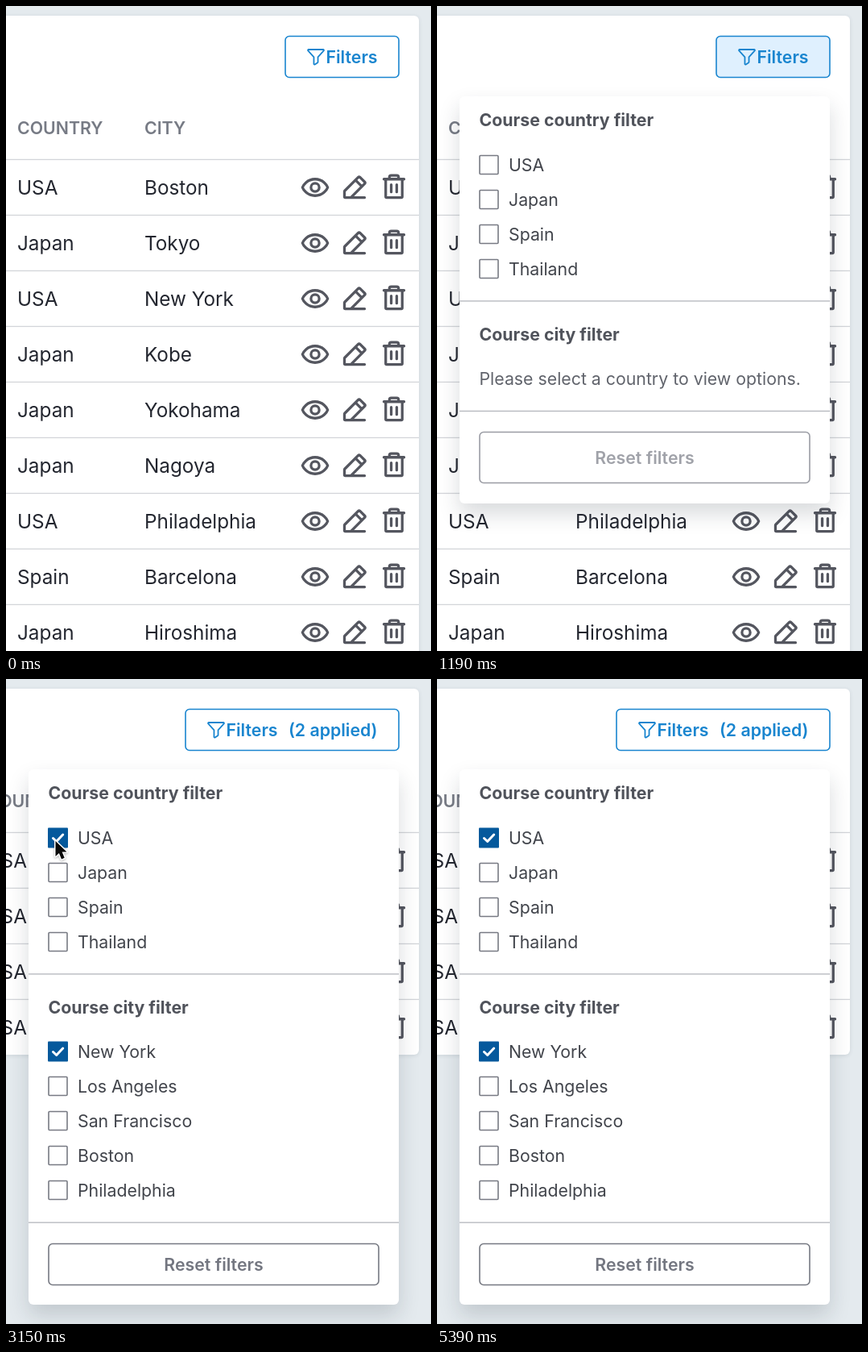
An HTML page with a canvas for the animation above (5.46 s loop, 528 px wide and 800 px high).

```html
<!DOCTYPE html>
<html lang="en">
<head>
<meta charset="utf-8">
<title>Table filters</title>
<style>
html, body { margin: 0; width: 100%; height: 100%; overflow: hidden; background: #e4eaee; }
canvas { display: block; width: 528px; height: 800px; }
</style>
</head>
<body>
<canvas id="stage"></canvas>
<script>
const W = 528, H = 800, LOOP = 5460;
const canvas = document.getElementById('stage');
const dpr = window.devicePixelRatio || 1;
canvas.width = W * dpr;
canvas.height = H * dpr;
const ctx = canvas.getContext('2d');

const BLUE = '#1985cf', ICON = '#54565f';
const ROWS = [
  ['USA', 'Boston'], ['Japan', 'Tokyo'], ['USA', 'New York'],
  ['Japan', 'Kobe'], ['Japan', 'Yokohama'], ['Japan', 'Nagoya'],
  ['USA', 'Philadelphia'], ['Spain', 'Barcelona'], ['Japan', 'Hiroshima']
];
const NY_ROWS = Array(4).fill(['USA', 'New York']);
const US_ROWS = Array(9).fill(['USA', 'Boston']);
const COUNTRIES = ['USA', 'Japan', 'Spain', 'Thailand'];
const CITIES = ['New York', 'Los Angeles', 'San Francisco', 'Boston', 'Philadelphia'];

// Icons on a 256-unit grid
const EYE = new Path2D('M128 56C58 56 24 110 18 128C24 146 58 200 128 200S232 146 238 128C232 110 198 56 128 56Z M164 128a36 36 0 1 1-72 0a36 36 0 1 1 72 0Z');
const PENCIL = new Path2D('M96 216H48a8 8 0 0 1-8-8v-44.7a8 8 0 0 1 2.3-5.6l120-120a8 8 0 0 1 11.4 0l44.6 44.6a8 8 0 0 1 0 11.4ZM216 216H96M136 64l56 56');
const TRASH = new Path2D('M216 56H40M104 104v64M152 104v64M200 56v152a8 8 0 0 1-8 8H64a8 8 0 0 1-8-8V56M168 56V40a16 16 0 0 0-16-16h-48a16 16 0 0 0-16 16v16');
const FUNNEL = new Path2D('M42 48h172a8 8 0 0 1 6 13.4L152 136v58a8 8 0 0 1-3.6 6.7l-32 21.3a8 8 0 0 1-12.4-6.6V136L36 61.4A8 8 0 0 1 42 48Z');
const ARROW = new Path2D('M0 0V19L4.4 15L7.5 22.4L11.2 20.8L8.1 13.6H14Z');
const HAND = new Path2D('M-2 2C-2-1 2-1 2 2V8C3 6 6 6 6 9C7 7 10 8 10 10C11 9 13 10 13 12V16C13 19 11 20 11 23H0C-1 20-5 17-7 13C-8 10-5 10-4 12L-2 14Z');

function text(str, x, cy, size, weight, color, align = 'left') {
  ctx.font = `${weight} ${size}px Inter, sans-serif`;
  ctx.fillStyle = color;
  ctx.textAlign = align;
  ctx.fillText(str, x, cy + size * 0.364);
}

function box(x, y, w, h, r, fill, stroke) {
  ctx.beginPath();
  ctx.roundRect(x, y, w, h, r);
  if (fill) { ctx.fillStyle = fill; ctx.fill(); }
  if (stroke) { ctx.strokeStyle = stroke; ctx.lineWidth = 1.6; ctx.stroke(); }
}

function raised(color, blur, dy, draw) {
  ctx.save();
  ctx.shadowColor = color;
  ctx.shadowBlur = blur * dpr;
  ctx.shadowOffsetY = dy * dpr;
  draw();
  ctx.restore();
}

function rule(x, y, w, color) {
  ctx.fillStyle = color;
  ctx.fillRect(x, y, w, 1.3);
}

function icon(path, x, y, scale, color, weight) {
  ctx.save();
  ctx.translate(x, y);
  ctx.scale(scale, scale);
  ctx.translate(-128, -128);
  ctx.strokeStyle = color;
  ctx.lineWidth = weight;
  ctx.lineCap = ctx.lineJoin = 'round';
  ctx.stroke(path);
  ctx.restore();
}

function table(rows, dx) {
  const bottom = 190 + rows.length * 69;
  raised('rgba(40,55,70,.12)', 5, 1, () =>
    box(-20, 12, 533, Math.min(bottom, 830) - 12, 6, '#fff'));
  text('COUNTRY', 14 + dx, 151, 21.3, 600, '#777b85');
  text('CITY', 172 + dx, 151, 21.3, 600, '#777b85');
  rows.forEach(([country, city], i) => {
    const y = 225 + i * 69;
    rule(0, y - 35.2, 513, '#d3d5d9');
    text(country, 14 + dx, y, 24.3, 400, '#23262f');
    text(city, 172 + dx, y, 24.3, 400, '#23262f');
    icon(EYE, 384, y, 0.1425, ICON, 23);
    icon(PENCIL, 433, y, 0.1425, ICON, 23);
    icon(TRASH, 482, y, 0.1425, ICON, 23);
  });
}

function filterButton(count, lit) {
  const x = count ? 223 : 347;
  box(x, 37.5, 488 - x, 51, 5, lit ? '#dff0fe' : '#fff', BLUE);
  icon(FUNNEL, x + 38, 62.5, 0.106, BLUE, 17);
  text('Filters', x + 50.5, 63, 21.3, 600, BLUE);
  if (count) text(`(${count} applied)`, 461.5, 63, 21.3, 600, BLUE, 'right');
}

function option(label, y, checked) {
  if (checked) {
    box(52, y - 12.5, 25, 25, 1, '#05599c');
    ctx.beginPath();
    ctx.moveTo(58.5, y + 0.5);
    ctx.lineTo(62.7, y + 4.5);
    ctx.lineTo(70.7, y - 4);
    ctx.strokeStyle = '#fff';
    ctx.lineWidth = 3;
    ctx.lineCap = ctx.lineJoin = 'round';
    ctx.stroke();
  } else {
    box(53, y - 11.5, 23, 23, 1, '#fff', '#777a83');
  }
  text(label, 89, y, 21.3, 400, '#41444b');
}

function panel(country, city) {
  const bottom = country ? 776 : 617;
  raised('rgba(30,40,55,.17)', 26, 13, () =>
    box(28, 112, 460, bottom - 112, 6, '#fff'));
  text('Course country filter', 52.5, 141, 21.3, 700, '#50535b');
  COUNTRIES.forEach((name, i) => option(name, 197 + i * 43, country && i === 0));
  rule(28, 365.3, 460, '#b4b6bc');
  text('Course city filter', 52.5, 407, 21.3, 700, '#50535b');
  if (country) CITIES.forEach((name, i) => option(name, 462 + i * 43, city && i === 0));
  else text('Please select a country to view options.', 52.5, 462, 21.3, 400, '#60636b');
  rule(28, country ? 673.5 : 501.8, 460, '#b4b6bc');
  if (country) box(53, 700.5, 410, 51, 5, '#fff', '#767982');
  else box(53, 528.5, 410, 63, 5, '#fff', '#9a9ca4');
  text('Reset filters', 258, country ? 726 : 560, 21.3, 600,
    country ? '#737680' : '#a0a2a9', 'center');
}

function tooltip() {
  raised('rgba(40,55,70,.10)', 8, 2, () => {
    box(302, -40, 240, 62, 4, '#f5f7f8');
    ctx.beginPath();
    ctx.moveTo(408, 22);
    ctx.lineTo(418, 30);
    ctx.lineTo(428, 22);
    ctx.fill();
  });
  text('Click to reveal filters', 315, -1.5, 21.3, 400, '#6b6e76');
}

function pointer(x, y, hand) {
  ctx.save();
  ctx.translate(x, y);
  ctx.lineJoin = 'round';
  ctx.strokeStyle = '#fff';
  ctx.fillStyle = '#0a0a0a';
  ctx.lineWidth = 3;
  raised('rgba(0,0,0,.3)', 3, 1, () => ctx.stroke(hand ? HAND : ARROW));
  ctx.fill(hand ? HAND : ARROW);
  if (hand) {
    ctx.fillStyle = '#fff';
    for (const fx of [1.5, 5, 8.5]) ctx.fillRect(fx, 14, 1.2, 6);
  }
  ctx.restore();
}

// Pointer stops: time, x, y
const PATH = [
  [280, 425, -30], [560, 400, 58], [1610, 400, 60], [1960, 69.5, 200],
  [2240, 61.5, 201], [2400, 61.5, 201], [2600, 66, 464], [2720, 66, 464],
  [2870, 61.5, 201], [3640, 61.5, 201], [4200, 128, 460], [4760, 128, 460],
  [5110, 150, 815]
];

function pointerAt(t) {
  for (let i = 1; i < PATH.length; i++) {
    const [t0, x0, y0] = PATH[i - 1], [t1, x1, y1] = PATH[i];
    if (t < t0 || t > t1) continue;
    const k = (t - t0) / (t1 - t0), e = k * k * (3 - 2 * k);
    return [x0 + (x1 - x0) * e, y0 + (y1 - y0) * e];
  }
  return null;
}

function draw(t) {
  const open = t >= 840, country = t >= 2310, city = t >= 2660;
  ctx.setTransform(dpr, 0, 0, dpr, 0, 0);
  ctx.fillStyle = '#e4eaee';
  ctx.fillRect(0, 0, W, H);

  if (city) table(NY_ROWS, -38.5);
  else table(country ? US_ROWS : ROWS, 0);
  filterButton(city ? 2 : country ? 1 : 0, t >= 490 && t < 1750);
  if (open) panel(country, city);
  if (t >= 630 && t < 910) tooltip();

  const pos = pointerAt(t);
  const hidden = t >= 910 && t < 1610;
  if (pos && !hidden) pointer(pos[0], pos[1], t >= 490 && t < 1680);
}

const start = performance.now();
function tick() {
  const t = (performance.now() - start) % LOOP;
  draw(Math.floor(t / 70) * 70);
  requestAnimationFrame(tick);
}
tick();
</script>
</body>
</html>
```
